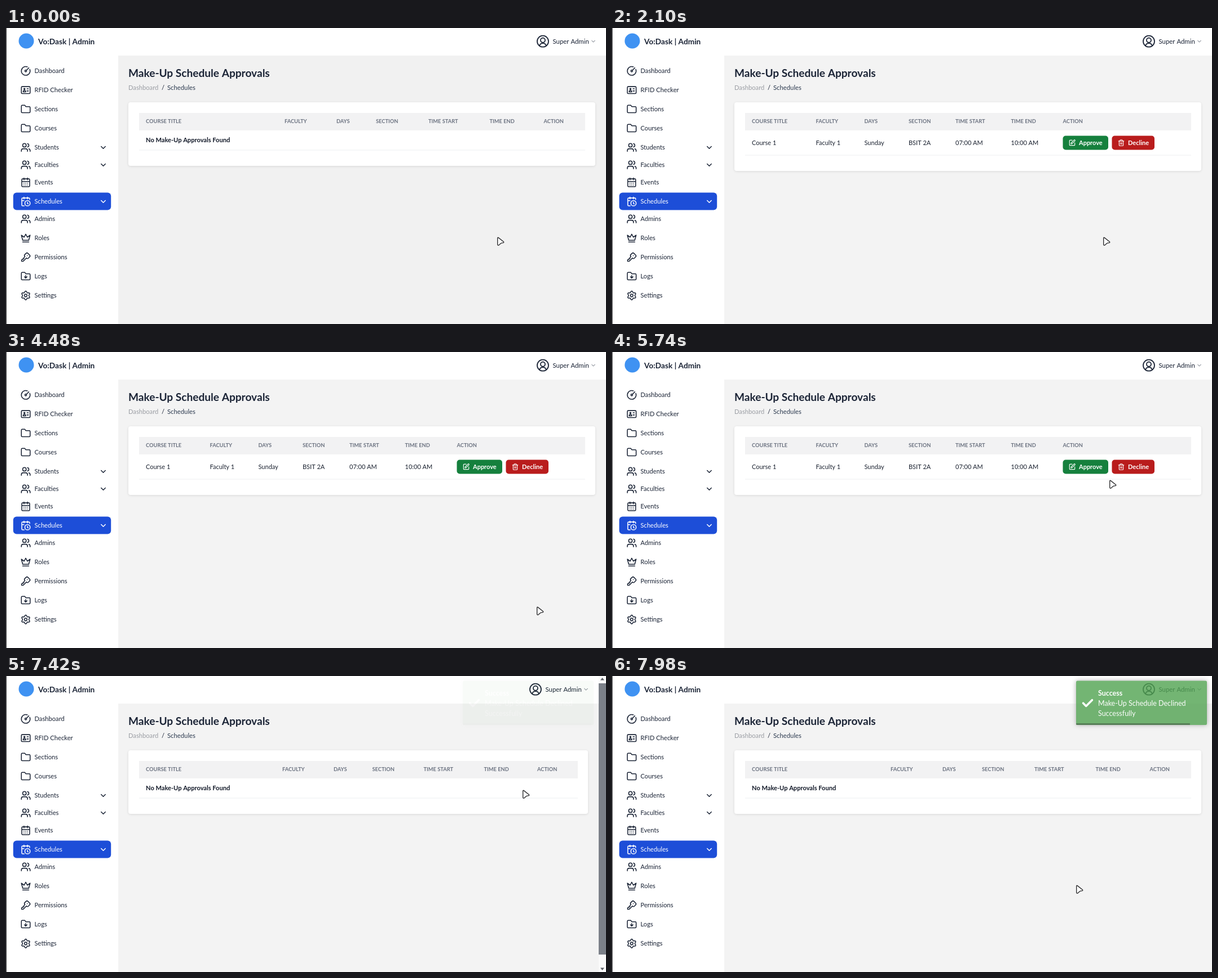
Animation of 1064x526 px, one loop 8 s. Source, as an HTML page with a canvas:

```html
<!DOCTYPE html>
<html lang="en">
<head>
<meta charset="utf-8">
<title>Make-Up Schedule Approvals</title>
<style>
html, body { margin: 0; width: 100%; height: 100%; overflow: hidden; background: #fff; }
canvas { display: block; width: 1064px; height: 526px; }
</style>
</head>
<body>
<canvas id="stage"></canvas>
<script>
const W = 1064, H = 526, LOOP = 8000, STEP = 70;
const dpr = window.devicePixelRatio || 1;

function context(canvas) {
  canvas.width = W * dpr;
  canvas.height = H * dpr;
  const c = canvas.getContext('2d');
  c.scale(dpr, dpr);
  return c;
}

const main = context(document.getElementById('stage'));
const layer = context(document.createElement('canvas'));
let ctx = main;

const SANS = 'Lato, "Open Sans", sans-serif';
const INK = '#1b2436', GREY = '#6b7280', WHITE = '#fff';

// Moments at which the page changes
const T = { status: 910, blank: 1470, loaded: 2030, barOn: 6020, hover: 6510,
  press: 6930, declined: 7350, toast: 7380, barOff: 7700 };

const ring = (x, y, r) => `M${x - r} ${y}a${r} ${r} 0 1 0 ${2 * r} 0a${r} ${r} 0 1 0 ${-2 * r} 0`;
const FOLDER = 'M4 20h16a2 2 0 0 0 2-2V8a2 2 0 0 0-2-2h-8l-2.2-3H4a2 2 0 0 0-2 2v13a2 2 0 0 0 2 2z';

function gear() {
  let d = '';
  for (let i = 0; i < 72; i++) {
    const a = i / 72 * Math.PI * 2, r = 8.6 + 1.5 * Math.cos(6 * a);
    d += (i ? 'L' : 'M') + (12 + r * Math.sin(a)).toFixed(2) + ' ' + (12 - r * Math.cos(a)).toFixed(2);
  }
  return d + 'z' + ring(12, 12, 3);
}

const ICONS = {
  gauge: 'M15.6 2.7a10 10 0 1 0 5.7 5.7M13.4 10.6 19 5' + ring(12, 12, 2),
  card: 'M4 4h16a2 2 0 0 1 2 2v12a2 2 0 0 1-2 2H4a2 2 0 0 1-2-2V6a2 2 0 0 1 2-2zM6 16c0-4 6-4 6 0zM15 9h3M15 14h3' + ring(9, 9.5, 1.3),
  folder: FOLDER,
  users: 'M16 21v-2a4 4 0 0 0-4-4H6a4 4 0 0 0-4 4v2M22 21v-2a4 4 0 0 0-3-3.9M16 3.1a4 4 0 0 1 0 7.8' + ring(9, 7, 4),
  calendar: 'M8 2v4M16 2v4M5 4h14a2 2 0 0 1 2 2v14a2 2 0 0 1-2 2H5a2 2 0 0 1-2-2V6a2 2 0 0 1 2-2zM3 10h18M8 14h.1M12 14h.1M16 14h.1M8 18h.1M12 18h.1M16 18h.1',
  clock: 'M21 7.5V6a2 2 0 0 0-2-2H5a2 2 0 0 0-2 2v14a2 2 0 0 0 2 2h3.5M16 2v4M8 2v4M3 10h5M17.5 17.5 16 16.3V14' + ring(16, 16, 6),
  crown: 'M12 3l3.7 7L22 5.4 18.8 17H5.2L2 5.4 8.3 10zM5 21h14',
  key: 'M16.9 3.1l4 4a2.9 2.9 0 0 1 0 4.1l-2.9 2.9a2.9 2.9 0 0 1-4.1 0l-.3-.3-7 7a2 2 0 0 1-1.3.6H2.5v-2.6a2 2 0 0 1 .6-1.4L3.6 17H6v-2.2h2v-2.2l2.2-2.2-.3-.3a2.9 2.9 0 0 1 0-4.1l2.9-2.9a2.9 2.9 0 0 1 4.1 0zM15.5 8.5h.1',
  inbox: FOLDER + 'M12 10v6M15 13l-3 3-3-3',
  gear: gear(),
  user: 'M18 20a6.2 6.2 0 0 0-12 0' + ring(12, 12, 10) + ring(12, 10, 4),
  pen: 'M12 3H5a2 2 0 0 0-2 2v14a2 2 0 0 0 2 2h14a2 2 0 0 0 2-2v-7M18.4 2.6a2.1 2.1 0 0 1 3 3L12 15l-4 1 1-4z',
  trash: 'M3 6h18M19 6v14a2 2 0 0 1-2 2H7a2 2 0 0 1-2-2V6M8 6V4a2 2 0 0 1 2-2h4a2 2 0 0 1 2 2v2M10 11v6M14 11v6',
  chevron: 'M6 9l6 6 6-6',
  check: 'M2 13l6.5 6.5L22 6'
};
for (const k in ICONS) ICONS[k] = new Path2D(ICONS[k]);

const ARROW = new Path2D('M.7 1.8Q.8 0 2.3 1L11.3 8.2Q12.4 9.6 10.6 10L6.8 10.8 3.3 14Q.9 15.4.7 13z');
const HAND = new Path2D('M3.5 9.5V2a1.5 1.5 0 0 1 3 0V6.3L10.6 7.3Q12.4 7.8 12 10L11.2 14Q10.6 16.5 8.6 16.5H6Q4.8 16.5 3.8 15L.8 11Q.4 9.5 2 9.2z');

const MENU = [
  ['Dashboard', 'gauge', 76], ['RFID Checker', 'card', 110], ['Sections', 'folder', 144],
  ['Courses', 'folder', 178], ['Students', 'users', 212, 1], ['Faculties', 'users', 243, 1],
  ['Events', 'calendar', 274], ['Schedules', 'clock', 308, 1], ['Admins', 'users', 339],
  ['Roles', 'crown', 373], ['Permissions', 'key', 407], ['Logs', 'inbox', 441], ['Settings', 'gear', 475]
];
const HEADS = ['COURSE TITLE', 'FACULTY', 'DAYS', 'SECTION', 'TIME START', 'TIME END', 'ACTION'];
const CELLS = ['Course 1', 'Faculty 1', 'Sunday', 'BSIT 2A', '07:00 AM', '10:00 AM'];
const COLS = {
  empty: [248, 494, 586, 656, 749, 857.5, 953.5],
  emptyBar: [248, 490, 581, 649.5, 740.5, 847.5, 942],
  row: [248, 361.5, 447.5, 526, 609, 707.5, 799.5],
  rowBar: [248, 359.5, 444.5, 521, 603, 700, 790.5]
};

// Pointer: [time, x, y]
const TRACK = [
  [0, 871, 372], [3780, 871, 372], [3850, 916, 381], [3990, 972, 398], [4130, 989, 450],
  [4270, 985, 510], [4410, 948, 462], [4480, 941, 453], [5320, 941, 453], [5460, 921, 392],
  [5530, 914, 350], [5740, 882, 228], [5810, 824, 230], [5880, 795, 252], [5950, 788, 310],
  [6090, 912, 277], [6160, 918, 249], [6370, 918, 230], [6510, 917, 214], [6650, 917, 209],
  [6790, 916, 204], [7350, 916, 203], [7420, 916, 203], [7560, 824, 230], [7700, 706, 340],
  [7840, 745, 368], [7980, 823, 372], [8000, 823, 372]
];

const clamp = v => Math.max(0, Math.min(1, v));
const swing = p => .5 - Math.cos(Math.PI * clamp(p)) / 2;

function pointerAt(t) {
  const i = Math.max(1, TRACK.findIndex(p => p[0] >= t));
  const [t0, x0, y0] = TRACK[i - 1], [t1, x1, y1] = TRACK[i];
  const p = clamp((t - t0) / (t1 - t0));
  return [x0 + (x1 - x0) * p, y0 + (y1 - y0) * p];
}

function mix(a, b, p) {
  return `rgb(${a.map((v, i) => Math.round(v + (b[i] - v) * p))})`;
}

function rect(x, y, w, h, color, r = 0) {
  ctx.fillStyle = color;
  ctx.beginPath();
  ctx.roundRect(x, y, w, h, r);
  ctx.fill();
}

function text(str, x, y, size, color = INK, weight = 400, font = SANS) {
  ctx.font = `${weight} ${size}px ${font}`;
  ctx.fillStyle = color;
  ctx.fillText(str, x, y);
}

function icon(name, cx, cy, size, color = INK, width = 2) {
  ctx.save();
  ctx.translate(cx - size / 2, cy - size / 2);
  ctx.scale(size / 24, size / 24);
  ctx.lineWidth = width;
  ctx.lineCap = ctx.lineJoin = 'round';
  ctx.strokeStyle = color;
  ctx.stroke(ICONS[name]);
  ctx.restore();
}

function shadow(color, blur, y) {
  ctx.shadowColor = color;
  ctx.shadowBlur = blur * dpr;
  ctx.shadowOffsetY = y * dpr;
}

// Paints on a separate layer, then blends it as a whole
function group(alpha, paint) {
  ctx = layer;
  ctx.clearRect(0, 0, W, H);
  paint();
  ctx = main;
  ctx.globalAlpha = alpha;
  ctx.drawImage(layer.canvas, 0, 0, W, H);
  ctx.globalAlpha = 1;
}

function sidebar() {
  ctx.fillStyle = '#3f92f2';
  ctx.beginPath();
  ctx.arc(36, 23, 13.5, 0, Math.PI * 2);
  ctx.fill();
  text('Vo:Dask | Admin', 57, 28.5, 13.7, INK, 700);
  rect(12.8, 292.6, 173.4, 31, '#1d4ed8', 6);
  for (const [label, name, y, more] of MENU) {
    const color = label === 'Schedules' ? WHITE : INK;
    icon(name, 35, y + .3, 18.6, color, 2);
    text(label, 50.5, y + 4, 11.2, color);
    if (more) icon('chevron', 172.5, y + .3, 15, color, 2.4);
  }
}

function button(x, w, label, name, color) {
  rect(x, 191.5, w, 25, color, 5);
  icon(name, x + 16.5, 204, 12.5, WHITE, 2.2);
  text(label, x + 28.5, 208, 11, WHITE, 700);
}

function declineColor(t) {
  const base = [185, 28, 28], hot = [239, 68, 68];
  const press = swing((t - T.press) / 140) - swing((t - T.press - 140) / 140);
  return mix(base, hot, clamp((t - T.hover + STEP) / 150) * (1 - .35 * press));
}

function table(t, full, bar) {
  const dx = bar ? -13 : 0, bottom = full ? 254 : 245, line = full ? 225.5 : 216.5;
  const cols = COLS[(full ? 'row' : 'empty') + (bar ? 'Bar' : '')];
  ctx.save();
  shadow('rgba(0,0,0,.11)', 4, 1);
  rect(217, 132, 828 + dx, bottom - 132, WHITE, 4);
  ctx.restore();
  rect(236, 151, 791 + dx, 31, '#f2f2f3');
  rect(236, line, 791 + dx, 1, '#eeeff1');
  HEADS.forEach((h, i) => text(h, cols[i], 169.2, 9.3, GREY, 700));
  if (!full) {
    text('No Make-Up Approvals Found', 248, 203.2, 11.1, '#111827', 700);
    return;
  }
  CELLS.forEach((c, i) => text(c, cols[i], 208, 11, '#1b2230'));
  button(cols[6], 80.5, 'Approve', 'pen', '#15803d');
  button(cols[6] + 87, 75.5, 'Decline', 'trash', declineColor(t));
}

function scrollbar() {
  rect(1051, 0, 13, H, '#fafafa');
  rect(1051, 13, 13, 482, '#7c8189');
  ctx.fillStyle = '#5c6066';
  for (const [y, d] of [[5.5, -1], [520.5, 1]]) {
    ctx.beginPath();
    ctx.moveTo(1054, y - 2 * d);
    ctx.lineTo(1061, y - 2 * d);
    ctx.lineTo(1057.5, y + 2.5 * d);
    ctx.fill();
  }
}

function toast(t, dx) {
  const left = 1 - (t - T.toast + 50) / 5000;
  ctx.save();
  ctx.translate(dx, 0);
  ctx.save();
  shadow('#999', 9, 0);
  rect(823, 8.5, 232, 78.5, '#51a351', 2.5);
  ctx.restore();
  icon('check', 843.5, 47.5, 19, WHITE, 4.6);
  text('Success', 862, 34.5, 12.5, WHITE, 700);
  text('Make-Up Schedule Declined', 862, 52.5, 12.5, WHITE);
  text('Successfully', 862, 71, 12.5, WHITE);
  rect(823, 84, 232 * left, 3, 'rgba(0,0,0,.4)');
  ctx.restore();
}

function page(t) {
  const bar = t >= T.barOn && t < T.barOff, dx = bar ? -13 : 0;
  const full = t >= T.loaded && t < T.declined;
  rect(199, 49, W - 199, H - 49, t < T.blank ? '#f1f1f1' : '#f3f3f3');
  sidebar();
  icon('user', 952 + dx, 23.7, 24, INK, 1.8);
  text('Super Admin', 969.5 + dx, 28, 11.4);
  icon('chevron', 1041.5 + dx, 23.7, 11, '#4b5563', 2);
  text('Make-Up Schedule Approvals', 217, 86.5, 19.1, INK, 700);
  text('Dashboard', 217, 110, 11.2, '#9a9da3');
  text('/', 276, 110, 11.2);
  text('Schedules', 286, 110, 11.3, '#2c3a4f');
  table(t, full, bar);
  if (bar) scrollbar();
  if (t > T.toast) group(.8 * swing((t - T.toast) / 300), () => toast(t, dx));
}

function pointer(t, color) {
  const [x, y] = pointerAt(t), hand = t >= T.hover && t < T.declined;
  ctx.save();
  ctx.translate(hand ? x - 5 : x, y - .4);
  ctx.lineWidth = 1.4;
  ctx.lineJoin = 'round';
  ctx.fillStyle = WHITE;
  ctx.strokeStyle = color;
  const shape = hand ? HAND : ARROW;
  ctx.fill(shape);
  ctx.stroke(shape);
  ctx.restore();
}

function draw(t) {
  const blank = t >= T.blank && t < T.loaded;
  rect(0, 0, W, H, blank ? '#fdfefe' : WHITE);
  if (!blank) page(t);
  if (t >= T.status && t < T.loaded) {
    rect(1, 510.5, 204, 15.5, '#2f2f33');
    text('Read unpkg.com', 4, 522.5, 9, '#f4f4f4', 400, '"Open Sans", "Noto Sans", sans-serif');
  }
  rect(0, 0, 1, H, '#3a3a3c');
  pointer(t, blank ? '#23803a' : '#2e2e30');
}

function tick(now) {
  const t = now % LOOP;
  draw(Math.floor(t / STEP) * STEP);
  requestAnimationFrame(tick);
}
requestAnimationFrame(tick);
</script>
</body>
</html>
```
